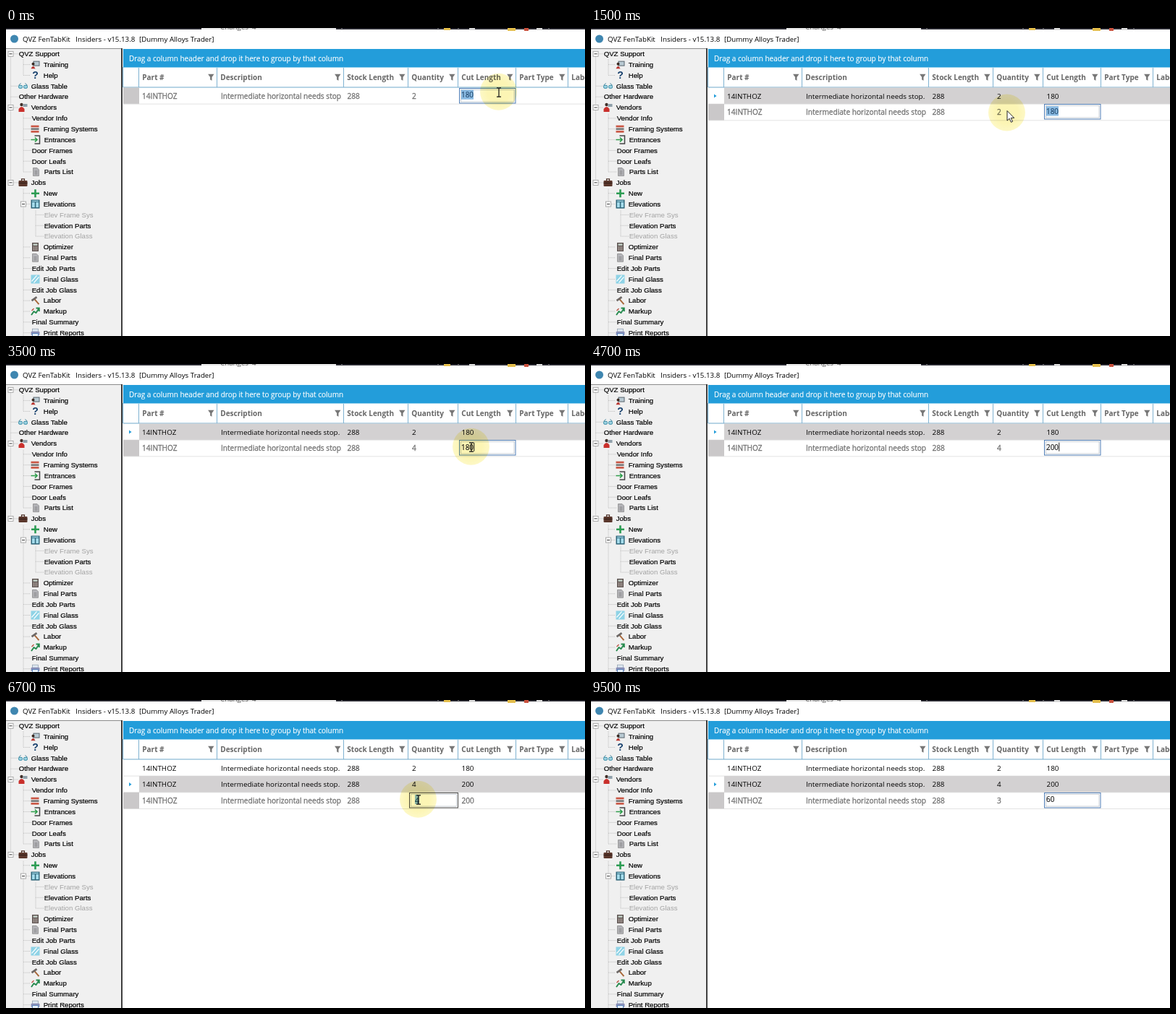
Write an HTML page that moves like this. It is 800 px wide and 426 px high and loops after 9600 ms.

```html
<!DOCTYPE html>
<html lang="en">
<head>
<meta charset="utf-8">
<title>Parts grid entry</title>
<style>
  html, body { margin: 0; width: 100%; height: 100%; overflow: hidden; background: #fff; }
  svg { display: block; width: 100%; height: 100%; }
  text { font: 9.85px "Open Sans", "Noto Sans", sans-serif; white-space: pre; }
  #tree text { font: 9.65px "Liberation Sans", Arial, sans-serif; stroke: #000; stroke-width: .2; }
  #tree .off { fill: #a3a3a3; stroke: none; }
  #tree .mark { font-size: 14px; font-weight: bold; fill: #17406d; text-anchor: middle; stroke: none; }
  #head text { font-size: 10px; font-weight: 700; fill: #666; }
  #head .hint { font-weight: 400; fill: #fff; stroke: #fff; stroke-width: .15; }
  #title text { font-size: 9.75px; }
  #rows .new { font-size: 10.12px; fill: #707070; stroke: #707070; stroke-width: .28; }
  #rows .typed { font-size: 9.9px; fill: #111; stroke: #111; stroke-width: .15; }
  #rows .picked { fill: #1f4468; stroke: #1f4468; }
  #halo { mix-blend-mode: multiply; }
</style>
</head>
<body>
<svg viewBox="0 0 800 426">
  <defs>
    <clipPath id="descClip"><rect x="296" y="82" width="167.3" height="80"/></clipPath>
    <radialGradient id="glow">
      <stop offset=".6" stop-color="#fcf5b4"/>
      <stop offset="1" stop-color="#fdf8c6"/>
    </radialGradient>
  </defs>
  <rect width="800" height="426" fill="#fff"/>

  <g id="title">
    <path d="M0 0H270V2H0ZM456 0H800V2H456Z" fill="#25252d"/>
    <path d="M270 0H456V2H270Z" fill="#e4e4e4"/>
    <path d="M464 0V3M597 0V3M625 0V3M750 0V3" stroke="#999"/>
    <path d="M605 0H614V3H605ZM693 0H704V4H693Z" fill="#e3bd4b"/>
    <path d="M640 0H648V3H640ZM733 0H741V3H733Z" fill="#d9d9d9"/>
    <path d="M716 0H722V4H716Z" fill="#c8503c"/>
    <text x="296" y="2.4" fill="#555">Changes  4</text>
    <circle cx="11.5" cy="15" r="5.5" fill="#3f86b0"/>
    <text x="23" y="18.8">QVZ FenTabKit</text>
    <text x="96.3" y="18.8">Insiders - v15.13.8</text>
    <text x="184" y="18.8">[Dummy Alloys Trader]</text>
  </g>

  <g id="tree">
    <rect y="28" width="160" height="398" fill="#f0f0f0"/>
    <path d="M0 28.5H160" stroke="#8c8c8c"/>
    <path d="M160 28V426" stroke="#2a2a2a" stroke-width="1.8"/>
  </g>

  <g id="head">
    <rect x="162" y="29" width="638" height="25.5" fill="#239dda"/>
    <text x="170" y="46.3" class="hint">Drag a column header and drop it here to group by that column</text>
    <path d="M161.7 54V82M162 82H800" stroke="#6fa8cb" fill="none"/>
  </g>

  <g id="rows"></g>

  <g id="pointer">
    <circle id="halo" r="25.5" fill="url(#glow)"/>
    <path id="arrow" d="M0 0V13.6L3.2 10.7 5.4 15.8 7.5 14.9 5.3 9.9H9.7Z" fill="#fff" stroke="#111" stroke-width=".9"/>
    <path id="beam" d="M-3-6.2H-.8L0-5.6.8-6.2H3M0-5.6V5.6M-3 6.2H-.8L0 5.6.8 6.2H3" fill="none" stroke="#111" stroke-width="1.2"/>
  </g>
</svg>

<script>
const LOOP = 9600;
const $ = id => document.getElementById(id);
const add = (id, markup) => $(id).insertAdjacentHTML('beforeend', markup);
const show = (id, on) => $(id).style.display = on ? '' : 'none';
const text = (x, y, s, attrs = '') => `<text x="${x}" y="${y}" ${attrs}>${s}</text>`;
const rect = (x, y, w, h, fill, attrs = '') =>
  `<rect x="${x}" y="${y}" width="${w}" height="${h}" fill="${fill}" ${attrs}/>`;
const path = (d, stroke, width = 1, fill = 'none') =>
  `<path d="${d}" stroke="${stroke}" stroke-width="${width}" fill="${fill}"/>`;
const dot = (x, y, r, fill, attrs = '') => `<circle cx="${x}" cy="${y}" r="${r}" fill="${fill}" ${attrs}/>`;

// Sidebar icons, each drawn around its own centre.
const icons = {
  training: rect(-3, -5, 9, 7, '#59656e') + rect(-2, -4, 7, 5, '#b9cad3') + dot(-3, -1, 2, '#3a2a22') + path('M-6 5.5Q-3 -1 0 5.5Z', 'none', 0, '#b7322c'),
  help: text(0, 5, '?', 'class="mark"'),
  glass: rect(-6, -1, 5, 4, '#9fd3e2', 'rx="1.5" stroke="#3c8fa8"') + rect(1, -1, 5, 4, '#9fd3e2', 'rx="1.5" stroke="#3c8fa8"') + path('M-6 -1L-3 -4M6 -1L3 -4', '#3c7f98'),
  vendor: dot(-2, -4, 2.2, '#40302a') + path('M-6 6V2Q-2 -4 2 2V6Z', 'none', 0, '#c9302c') + rect(0, -5, 6, 4, '#8fa0aa'),
  framing: rect(-6, -5, 11, 2.6, '#c95543') + rect(-6, -1.3, 11, 2.6, '#777') + rect(-6, 2.4, 11, 2.6, '#c95543'),
  entrance: path('M-2 -5.5H5V5.5H-2', '#444', 1.5) + path('M-7 0H1M-1.5 -3L1.5 0L-1.5 3', '#2f9e4c', 1.7),
  page: path('M-4 -5.5H1.5L4 -3V5.5H-4Z', '#8b8b8b', .8, '#b4b4b8') + path('M-2 -1H2M-2 1H2M-2 3H2', '#777', .7),
  jobs: path('M-2 -3V-5H2V-3', '#4a2d24', 1.2) + rect(-6, -3, 12, 8, '#5a372c', 'rx="1"') + path('M-6 .5H6', '#2f1b15'),
  plus: path('M0 -5.5V5.5M-5.5 0H5.5', '#2c9c53', 2.6),
  window: rect(-6, -6, 12, 12, '#2d6478') + rect(-4.5, -2.5, 3.8, 7, '#a5dcec') + rect(.8, -2.5, 3.8, 7, '#a5dcec') + rect(-4.5, -4.8, 9, 1.4, '#a5dcec'),
  calc: rect(-4.5, -6, 9, 12, '#5d5350') + rect(-3, -4.5, 6, 2.4, '#c8d5cc') + path('M-3 0H3M-3 2H3M-3 4H3', '#c9bdb8', 1.1) + path('M-1 -1V5M1 -1V5', '#5d5350', .7),
  pane: rect(-6, -6, 12, 12, '#8fd3e6') + path('M-5 3L2 -5M-2 5L5 -3', '#fff', 1.3),
  hammer: path('M5 5L-1 -2', '#a8683a', 1.9) + path('M-5 0L2 -5', '#6d6866', 2.6),
  markup: path('M-5.5 5L-2 0L1 2L5 -4M1 -4.5H5.3V0', '#23894c', 1.9) + path('M-5 -1L-2 -4', '#b84a3a', 1.3),
  printer: rect(-4, -5.5, 8, 4, '#dfe9f2', 'stroke="#8a98a8" stroke-width=".7"') + rect(-6, -2, 12, 5, '#8a8fb8', 'rx="1"') + rect(-4, 1, 8, 4.5, '#e8f1fa', 'stroke="#4579b8" stroke-width=".8"')
};

// [label x, label, icon]; a leading "-" marks an open branch, "~" a disabled entry.
const tree = [
  [18, '-QVZ Support'], [52, 'Training', 'training'], [52, 'Help', 'help'], [35, 'Glass Table', 'glass'],
  [18, 'Other Hardware'], [35, '-Vendors', 'vendor'], [36, 'Vendor Info'], [52, 'Framing Systems', 'framing'],
  [53, 'Entrances', 'entrance'], [36, 'Door Frames'], [36, 'Door Leafs'], [53, 'Parts List', 'page'],
  [35, '-Jobs', 'jobs'], [52, 'New', 'plus'], [52, '-Elevations', 'window'], [53, '~Elev Frame Sys'],
  [53, 'Elevation Parts'], [53, '~Elevation Glass'], [52, 'Optimizer', 'calc'], [52, 'Final Parts', 'page'],
  [36, 'Edit Job Parts'], [52, 'Final Glass', 'pane'], [36, 'Edit Job Glass'], [52, 'Labor', 'hammer'],
  [52, 'Markup', 'markup'], [36, 'Final Summary'], [52, 'Print Reports', 'printer']
];
const treeY = i => 35.8 + 14.84 * i;

function drawTree() {
  const stem = (x, a, b) => `M${x} ${treeY(a)}V${treeY(b)}`;
  let guides = stem(6.5, 0, 12) + stem(24, .5, 2) + stem(24, 5.6, 11) + stem(24, 12.6, 26.3) + stem(41, 14.6, 17);
  let out = '';
  tree.forEach(([x, label, icon], i) => {
    const y = treeY(i);
    const edge = x - (icon ? 18 : 1);
    const joint = edge < 20 ? 6.5 : edge < 45 ? 24 : 41;
    guides += `M${joint} ${y}H${edge}`;
    if (icon) out += `<g transform="translate(${x - 11.5} ${y})">${icons[icon]}</g>`;
    if (label[0] === '-')
      out += rect(joint - 3.5, y - 3.5, 7, 7, '#fff', 'stroke="#999" stroke-width=".8"') + path(`M${joint - 2} ${y}h4`, '#333');
    out += text(x - .3, y + 3.3, label.replace(/^[-~]/, ''), label[0] === '~' ? 'class="off"' : '');
  });
  add('tree', `<path d="${guides}" fill="none" stroke="#b0b0b0" stroke-width=".8" stroke-dasharray="1 1"/>` + out);
}

const edges = [184, 292, 467, 556, 625, 705, 777];
const labels = ['Part #', 'Description', 'Stock Length', 'Quantity', 'Cut Length', 'Part Type', 'Label'];

function drawHead() {
  edges.forEach((x, i) => {
    add('head', path(`M${x - .5} 55V82`, '#7fb2d1') + text(x + 4.3, 72.3, labels[i]));
    if (i) add('head', `<path transform="translate(${x - 8.7} 68)" d="M-4.2-4.3H4.2L1.2 0V4.8L-1.2 3.4V0Z" fill="#777"/>`);
  });
}

const ROW_H = 22.7, DIGIT = 5.66;
const rowTop = i => 82.4 + ROW_H * i;
const editors = {
  qty: { x: 557.5, w: 67, textX: 565, base: 14.8, line: '#4a4a4a' },
  cut: { x: 626.5, w: 77.5, textX: 629, base: 13.6, line: '#4f7db5' }
};
const saved = [['2', '180'], ['4', '200']];

// [time, new row index, edited column, its text, selected, value of the other column]
const steps = [
  [0, 0, 'cut', '180', true, '2'],
  [300, 1, 'cut', '180', true, '2'],
  [1800, 1, 'qty', '2', true, '180'],
  [2200, 1, 'qty', '4', false, '180'],
  [3000, 1, 'cut', '180', false, '4'],
  [3600, 1, 'cut', '180', true, '4'],
  [4100, 1, 'cut', '2', false, '4'],
  [4300, 1, 'cut', '20', false, '4'],
  [4500, 1, 'cut', '200', false, '4'],
  [5000, 2, 'cut', '200', true, '4'],
  [6400, 2, 'qty', '4', true, '200'],
  [6900, 2, 'qty', '3', false, '200'],
  [7600, 2, 'cut', '200', false, '3'],
  [8200, 2, 'cut', '200', true, '3'],
  [8600, 2, 'cut', '6', false, '3'],
  [8900, 2, 'cut', '60', false, '3']
];

function rowMarkup(i, newRow, qty, cut) {
  const top = rowTop(i), base = top + 15.2;
  const style = i === newRow ? 'class="new"' : '';
  let out = '';
  if (i === newRow) out += rect(162, top, 22, ROW_H, '#cac8c9');
  if (i === newRow - 1)
    out += rect(184, top, 616, ROW_H, '#d3d1d2') + `<path d="M170 ${top + 9}l3.5 2.6-3.5 2.6Z" fill="#239dda"/>`;
  out += path(`M162 ${top + ROW_H}H800`, '#dcdcdc', .8)
    + text(188, base, '14INTHOZ', style) + text(471.5, base, '288', style)
    + `<g clip-path="url(#descClip)">${text(297, base, 'Intermediate horizontal needs stop.', style)}</g>`;
  return out + text(561, base, qty, style) + text(629.5, base, cut, style);
}

function editorMarkup([, row, col, value, selected]) {
  const { x, w, textX, base, line } = editors[col];
  const top = rowTop(row), y = Math.round(top + .1) + .5;
  const end = textX + value.length * DIGIT;
  let out = rect(x, y, w, 20.5, '#fff', `stroke="${line}"`)
    + rect(x + 2, y + 2, w - 4, 16.5, 'none', 'stroke="#b4bcc6" stroke-width=".7"');
  out += selected
    ? rect(textX, top + 3.2, end - textX, 13.2, '#8abbe3')
    : `<g id="caret">${path(`M${end + .8} ${top + base - 10}v12`, '#000', .9)}</g>`;
  return out + text(textX, top + base, value, `class="typed ${selected ? 'picked' : ''}"`);
}

function drawRows(step) {
  const [, newRow, col, , , other] = step;
  let out = '';
  for (let i = 0; i < newRow; i++) out += rowMarkup(i, newRow, ...saved[i]);
  out += rowMarkup(newRow, newRow, col === 'cut' ? other : '', col === 'qty' ? other : '');
  $('rows').innerHTML = out + editorMarkup(step);
}

// [time, x, y]; without a place the pointer is hidden by typing.
const track = [
  [0, 681, 89], [400, 681, 89], [600, 687, 80], [1100, 687, 80], [1500, 575, 114.5], [1800, 569, 115],
  [2200], [2400, 572, 115], [2700, 660, 113.5], [3000, 652, 115], [3400, 646, 115], [3600, 640, 115], [4100],
  [5100, 642, 120.5], [5700, 642, 120.5], [6200, 570, 138], [6900],
  [7200, 574, 138], [7600, 649.5, 138], [7900, 649.5, 138], [8200, 640, 138], [8600]
];
const lastAt = (list, t) => list.findLastIndex(entry => entry[0] <= t);

function movePointer(t, step) {
  const i = lastAt(track, t);
  const [t0, x0, y0] = track[i];
  const visible = x0 !== undefined;
  show('pointer', visible);
  if (!visible) return;
  const [t1, x1 = x0, y1 = y0] = track[i + 1];
  const k = (t - t0) / (t1 - t0), ease = k * k * (3 - 2 * k);
  const x = x0 + (x1 - x0) * ease, y = y0 + (y1 - y0) * ease;
  const box = editors[step[2]], top = rowTop(step[1]);
  const editing = x > box.x && x < box.x + box.w && y > top && y < top + ROW_H;
  show('beam', editing);
  show('arrow', !editing);
  $('halo').setAttribute('cx', x - .5);
  $('halo').setAttribute('cy', y + (editing ? -.7 : 2.5));
  for (const id of ['beam', 'arrow']) $(id).setAttribute('transform', `translate(${x} ${y})`);
}

let start, shown;
function frame(now) {
  start ??= now;
  const t = Math.floor(((now - start) % LOOP + 1) / 100) * 100 % LOOP;
  const step = steps[lastAt(steps, t)];
  if (step !== shown) drawRows(shown = step);
  if ($('caret')) show('caret', (t - step[0]) % 1060 < 530);
  movePointer(t, step);
  requestAnimationFrame(frame);
}

drawTree();
drawHead();
requestAnimationFrame(frame);
</script>
</body>
</html>
```
